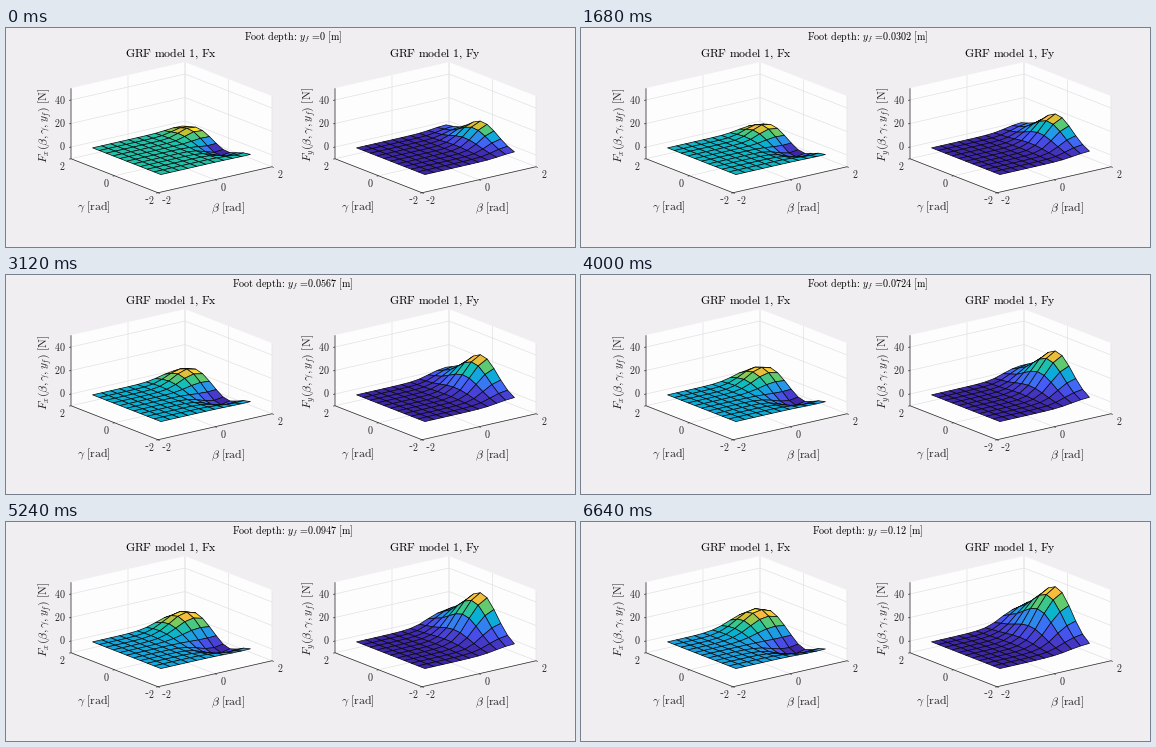
Animation, 569 px wide and 219 px high, one loop 6.68 s. Source, as a matplotlib script:

```python
import numpy as np
import matplotlib.pyplot as plt
from matplotlib.animation import FuncAnimation
from matplotlib.collections import PolyCollection
from matplotlib.colors import LinearSegmentedColormap

W, H, DPI = 569, 219, 64
FRAMES, INTERVAL = 167, 40
MAX_DEPTH, STEPS = 0.12, 199
PANEL_SHIFT = 264
BG, WALL, GRID, INK = "#f0eef0", "#fefdfe", "#e2e1e3", "#262626"

plt.rcParams["mathtext.fontset"] = "cm"

parula = LinearSegmentedColormap.from_list("parula", [
    (0, (.242, .150, .660)), (.083, (.278, .245, .825)),
    (.167, (.278, .356, .978)), (.333, (.154, .590, .922)),
    (.417, (.030, .687, .835)), (.5, (.070, .746, .726)),
    (.583, (.230, .780, .545)), (.667, (.504, .799, .348)),
    (.75, (.775, .760, .200)), (.833, (.987, .735, .244)),
    (.917, (.982, .850, .170)), (1, (.977, .984, .081))])


def pt(px):
    return px * 72 / DPI


def project(b, g, z, dx=0):
    """Orthographic view of (beta, gamma, force) in stage pixels."""
    x = 165.5 + dx + 28.5 * b - 21.75 * g
    y = 123 - 6.5 * b - 8.5 * g - 1.175 * z
    return np.stack(np.broadcast_arrays(x, y), axis=-1)


def mix(a, b, u):
    return a + (b - a) * u


def bell(v, mid, width):
    return np.exp(-((v - mid) / width) ** 2)


def rise(b, mid, width):
    def step(v):
        return 1 / (1 + np.exp(-(v - mid) / width))
    return step(b) / step(np.pi / 2)


def force_x(b, g, u):
    push = (mix(6, 16.5, u) * bell(g, mix(.85, 1, u), mix(.6, .8, u))
            * bell(b, mix(1.35, 1.2, u), mix(.5, .85, u)))
    pull = (mix(6.8, 10, u) * bell(g, mix(-.5, -.6, u), mix(.6, .62, u))
            * bell(b, mix(1.35, 1.2, u), mix(.55, .8, u)))
    return push - pull


def force_y(b, g, u):
    mid = mix(-.1, -.05, u)
    width = np.where(g > mid, mix(.9, 1.25, u), 1.0)
    peak = mix(17, 41, u) * bell(g, mid, width)
    shoulder = mix(1.8, 6, u) * bell(g, 1.45, .45)
    return (peak + shoulder) * rise(b, mix(1.05, .85, u), mix(.2, .26, u))


fig = plt.figure(figsize=(W / DPI, H / DPI), dpi=DPI, facecolor=BG)
ax = fig.add_axes([0, 0, 1, 1])
ax.set(xlim=(0, W), ylim=(H, 0))
ax.axis("off")


def label(x, y, s, size, color=INK, **kw):
    kw = {"ha": "center", "va": "center", **kw}
    return ax.text(x, y, s, fontsize=pt(size), color=color, **kw)


def tick_label(x, y, value, **kw):
    if value < 0:
        label(x - 2.9, y, "-", 11, family="Liberation Serif")
        x += 1.8
    label(x, y, rf"$\mathrm{{{abs(value)}}}$", 10, **kw)


def line(points, color, width, z):
    ax.plot(*np.array(points).T, color=color, lw=pt(width), zorder=z,
            solid_capstyle="butt")


def draw_box(dx, sub):
    def p(b, g, z):
        return project(b, g, z, dx)

    lo, hi = -10, 50
    faces = [
        [p(-2, -2, lo), p(2, -2, lo), p(2, 2, lo), p(-2, 2, lo)],
        [p(-2, 2, lo), p(2, 2, lo), p(2, 2, hi), p(-2, 2, hi)],
        [p(2, -2, lo), p(2, 2, lo), p(2, 2, hi), p(2, -2, hi)],
    ]
    ax.add_collection(PolyCollection(faces, facecolor=WALL, edgecolor=WALL,
                                     lw=pt(.4), zorder=1))
    for v in (-2, 0, 2):
        line([p(v, -2, lo), p(v, 2, lo), p(v, 2, hi)], GRID, .7, 2)
        line([p(-2, v, lo), p(2, v, lo), p(2, v, hi)], GRID, .7, 2)
    for z in (0, 20, 40):
        line([p(-2, 2, z), p(2, 2, z), p(2, -2, z)], GRID, .7, 2)

    line([p(-2, 2, hi), p(-2, 2, lo), p(-2, -2, lo), p(2, -2, lo)], INK, .7, 3)
    for v in (-2, 0, 2):
        for start, step in ((p(v, -2, lo), (1.7, .7)),
                            (p(-2, v, lo), (-1.8, .4))):
            line([start, start + step], INK, .7, 3)
        x, y = p(v, -2, lo)
        tick_label(x + 8.5, y + 7.5, v)
        x, y = p(-2, v, lo)
        tick_label(x - 8.5, y + 7, v)
    for z in (0, 20, 40):
        x, y = p(-2, 2, z)
        line([(x, y), (x - 1.8, y + .4)], INK, .7, 3)
        tick_label(x - 5.5, y - .5, z, ha="right")

    label(88 + dx, 179, r"$\gamma\ \mathrm{[rad]}$", 11.8)
    label(222 + dx, 180, r"$\beta\ \mathrm{[rad]}$", 11.8)
    label(39.5 + dx, 97,
          rf"$F_{sub}(\beta,\gamma,y_f)\ \mathrm{{[N]}}$", 11.8, rotation=90)
    label(165 + dx, 25.5, rf"$\mathrm{{GRF\ model\ 1,\,F{sub}}}$", 11.8,
          color="black")


class Surface:
    """Flat-shaded height field, painted from back to front."""
    axis = np.linspace(-np.pi / 2, np.pi / 2, 11)
    b, g = np.meshgrid(axis, axis, indexing="ij")

    def __init__(self, force, dx):
        self.force, self.dx = force, dx
        self.mesh = PolyCollection([], edgecolor="#080808", lw=pt(.7),
                                   joinstyle="round", zorder=5)
        ax.add_collection(self.mesh)

    def update(self, u):
        z = self.force(self.b, self.g, u)
        p = project(self.b, self.g, z, self.dx)
        quads = np.stack([p[:-1, :-1], p[1:, :-1], p[1:, 1:], p[:-1, 1:]],
                         axis=2)
        shade = (z[:-1, :-1] - z.min()) / np.ptp(z)
        self.mesh.set_verts(quads.reshape(-1, 4, 2)[::-1])
        self.mesh.set_facecolor(parula(shade.ravel()[::-1]))


draw_box(0, "x")
draw_box(PANEL_SHIFT, "y")
surfaces = [Surface(force_x, 0), Surface(force_y, PANEL_SHIFT)]
heading = label(287, 9, "", 10.1, color="black")


def update(i):
    u = min(round(1.2 * i), STEPS) / STEPS
    for surface in surfaces:
        surface.update(u)
    heading.set_text(r"$\mathrm{Foot\ depth\!:\,}y_f\,=\!\mathrm{"
                     + f"{MAX_DEPTH * u:.3g}" + r"\ [m]}$")
    return [s.mesh for s in surfaces] + [heading]


anim = FuncAnimation(fig, update, frames=FRAMES, interval=INTERVAL,
                     init_func=lambda: update(0), repeat=True, repeat_delay=0)
plt.show()
```
